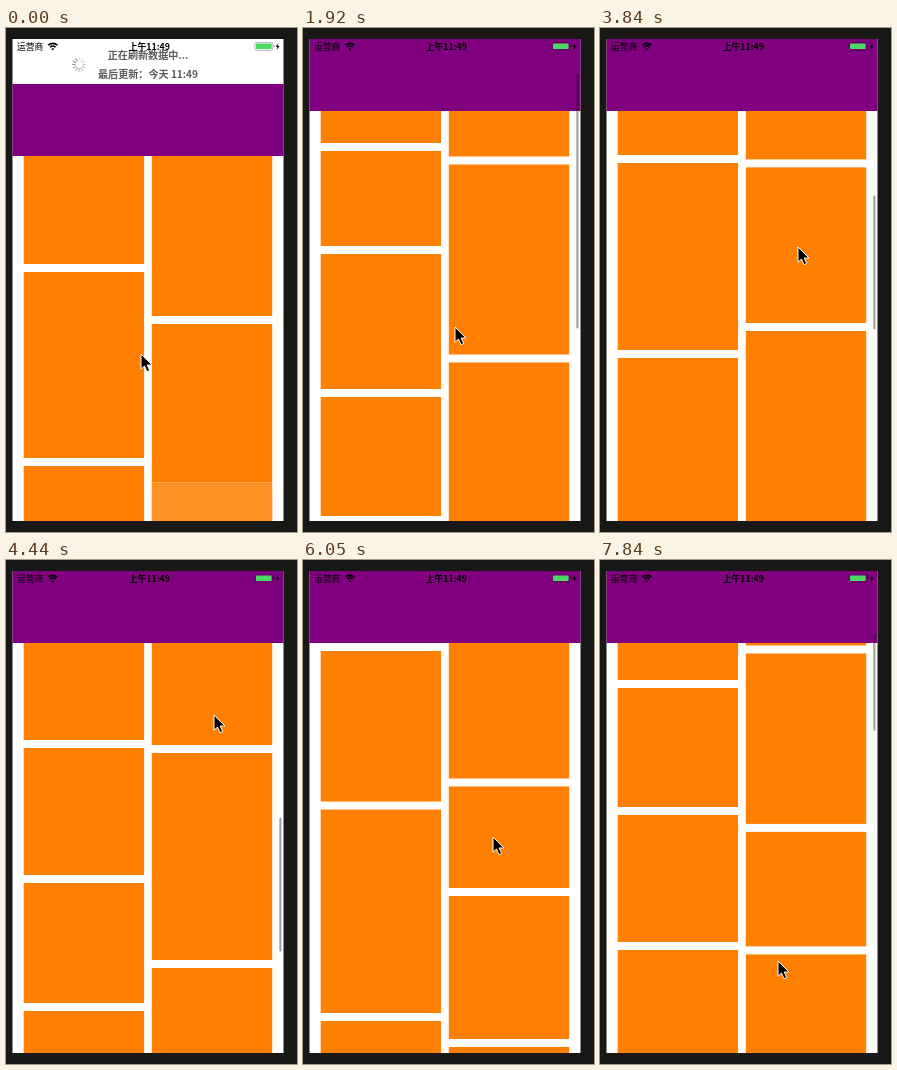
An HTML page that plays this animation: 291x504 px, repeating every 7990 ms.

```html
<!DOCTYPE html>
<html lang="zh">
<head>
<meta charset="utf-8">
<style>
  html, body { margin: 0; width: 100%; height: 100%; overflow: hidden; background: #181917; }
  svg { display: block; width: 291px; height: 504px; }
  text { font-family: "Noto Sans CJK SC", "Noto Sans CJK", "Noto Sans", sans-serif; }
  .refresh text { font-size: 10.1px; font-weight: 700; fill: #5a5a5a; text-anchor: middle; }
  .status text { font-size: 8.8px; }
  .cells rect { fill: #ff8000; }
</style>
</head>
<body>
<svg viewBox="0 0 291 504">
  <defs><clipPath id="screen"><rect x="6.5" y="11" width="271" height="482"/></clipPath></defs>
  <rect width="291" height="504" fill="#181917"/>
  <g clip-path="url(#screen)">
    <rect x="6" y="11" width="273" height="482" fill="#fff"/>
    <g id="list"></g>
    <g id="top">
      <g class="refresh">
        <g id="spinner" transform="translate(73 -19.5)"></g>
        <text x="142" y="-25">正在刷新数据中...</text>
        <text x="142" y="-6">最后更新：今天 11:49</text>
      </g>
      <rect x="6" y="0" width="273" height="72" fill="#800080"/>
    </g>
    <rect id="bar" x="273.3" width="2.2" rx="1.1" fill="#000" opacity=".36"/>
    <g class="status">
      <text x="11" y="21.7">运营商</text>
      <g fill="none" stroke="#000" stroke-width="1.6">
        <path d="M42.2 17.3a6.4 6.4 0 0 1 9.2 0M44 19.3a4 4 0 0 1 5.6 0"/>
        <path d="M46.8 19.9l-1.3 1 1.3 1.5 1.3-1.5z" fill="#000" stroke="none"/>
      </g>
      <text x="143.3" y="21.6" text-anchor="middle" font-weight="700">上午11:49</text>
      <rect x="248.8" y="14.3" width="18" height="8" rx="2" fill="none" stroke="#000" stroke-opacity=".4" stroke-width=".7"/>
      <rect x="250" y="15.5" width="15.6" height="5.6" rx="1" fill="#4cd964"/>
      <path d="M267.5 17v2.6q1.2-.4 1.2-1.3t-1.2-1.3" fill="#000" opacity=".4"/>
      <path d="M272.6 15l-3 3.8h1.8l-.7 3 3-3.9h-1.9z"/>
    </g>
  </g>
  <path id="cursor" d="M0 0V15.2L3.5 12L6 17.7L8.7 16.5L6.2 11H11Z" fill="#000" stroke="#fff" stroke-width="1" stroke-linejoin="round"/>
</svg>
<script>
const LOOP = 7990, STEPS = 54, STEP = LOOP / STEPS;
const VIEW = 482, GAP = 8, LIST_TOP = 83;
const RELOAD = 9;
const $ = id => document.getElementById(id);

function add(parent, tag, attrs) {
  const node = document.createElementNS("http://www.w3.org/2000/svg", tag);
  for (const key in attrs) node.setAttribute(key, attrs[key]);
  return parent.appendChild(node);
}

// Column heights per loaded page: left, right, first step shown, scroll height
const oldPage = { left: [108, 186, 150], right: [160, 158, 150] };
const pages = [
  { left: [95, 95, 135, 119, 127, 187], right: [108.5, 190, 170.4, 114.5], from: RELOAD, height: 909 },
  { left: [176, 127, 120, 150.5, 203.5], right: [155.6, 208, 207, 170.5, 101.5], from: 21, height: 1727 },
  { left: [185], right: [143, 190], from: 38, height: 2385 }
];

function buildPage(page, start) {
  const group = add($("list"), "g", { class: "cells" });
  const column = (heights, x, y) => {
    for (const height of heights) {
      add(group, "rect", { x, y, width: 120.4, height });
      y += height + GAP;
    }
    return y;
  };
  page.group = group;
  return [column(page.left, 17.7, start[0]), column(page.right, 145.8, start[1])];
}

buildPage(oldPage, [LIST_TOP, LIST_TOP]);
const fading = add(oldPage.group, "g", {});
add(fading, "rect", { x: 145.8, y: 409, width: 120.4, height: 60, style: "fill:#ff9224" });
add(fading, "rect", { x: 145.8, y: 409, width: 120.4, height: 1, style: "fill:#ffa54a" });
pages.reduce((ends, page) => buildPage(page, ends), [LIST_TOP, LIST_TOP]);

const spokes = Array.from({ length: 12 }, (_, i) => add($("spinner"), "line", {
  y1: -3.7, y2: -6.6, stroke: "#777", "stroke-width": 1.1, "stroke-linecap": "round", transform: `rotate(${i * 30})`
}));

// [step, scroll offset]
const scroll = [
  [0, -45], [1, -41], [2, -39], [8, -39], [9, -22], [10, -5], [11, 0], [12, 22], [13, 63],
  [14, 130], [16, 300], [17, 372], [18, 430], [19, 468], [20, 488], [21, 480], [22, 440],
  [23, 427], [24, 435], [25, 490], [26, 559], [29, 810], [31, 960], [33, 1090], [34, 1144],
  [35, 1190], [36, 1225], [37, 1245], [42, 1245], [43, 1220], [44, 1160], [47, 865],
  [50, 570], [52, 385], [53, 304]
];
// [step, x, y]
const pointer = [
  [0, 135, 326], [9, 140, 350], [11, 150, 362], [13, 152, 299], [16, 165, 170], [20, 175, 135],
  [24, 194, 343], [25, 196, 288], [26, 198, 219], [28, 204, 125], [31, 210, 170], [34, 212, 234],
  [38, 200, 260], [41, 190, 277], [42, 190, 277], [44, 188, 362], [46, 186, 445], [50, 178, 220],
  [53, 178, 401]
];

function at(keys, step, column = 1) {
  const next = Math.max(1, keys.findIndex(key => key[0] >= step));
  const a = keys[next - 1], b = keys[next];
  return a[column] + (b[column] - a[column]) * (step - a[0]) / (b[0] - a[0]);
}

const show = (node, visible) => node.setAttribute("display", visible ? "inline" : "none");
const move = (node, x, y) => node.setAttribute("transform", `translate(${x} ${y})`);

function drawBar(step, offset) {
  show($("bar"), (step >= 12 && step < 40) || step >= 43);
  const { height } = pages.filter(page => step >= page.from).pop() || pages[0];
  const full = VIEW * (VIEW - 2) / height;
  const range = height - VIEW;
  const over = Math.max(0, offset - range);
  const length = full - over;
  const y = 13 + Math.max(0, Math.min(offset, range)) * (VIEW - 4 - full) / range + over;
  $("bar").setAttribute("y", y);
  $("bar").setAttribute("height", length);
}

function draw(step) {
  const offset = at(scroll, step);
  move($("list"), 0, -offset);
  move($("top"), 0, 11 + Math.max(0, -offset));
  move($("cursor"), at(pointer, step, 1), at(pointer, step, 2));
  show(oldPage.group, step < RELOAD);
  show(fading, step === 0);
  pages.forEach(page => show(page.group, step >= page.from));
  spokes.forEach((spoke, i) => {
    const age = (step * 2 + 23 - i) % 12;
    spoke.setAttribute("opacity", 0.85 - age * 0.055);
  });
  drawBar(step, offset);
}

const began = performance.now();
let shown = -1;
function tick() {
  const time = (performance.now() - began) % LOOP;
  const step = Math.min(STEPS - 1, Math.floor((time + 18) / STEP));
  if (step !== shown) draw(shown = step);
  requestAnimationFrame(tick);
}
tick();
</script>
</body>
</html>
```
